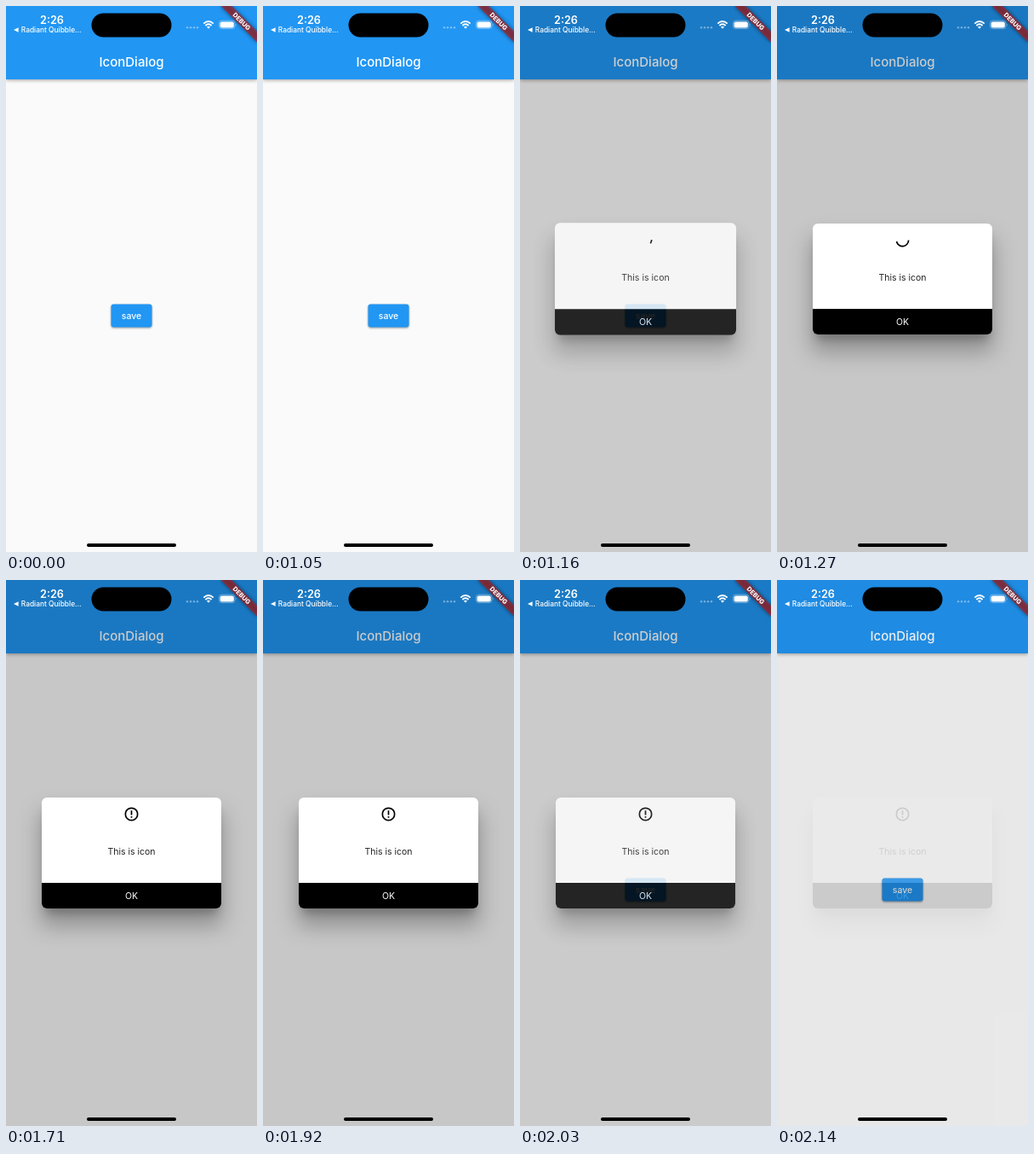
These frames come from a looping animation (295x640 px, 2.24 s). An HTML page:

```html
<!DOCTYPE html>
<html lang="en">
<head>
<meta charset="utf-8">
<title>IconDialog</title>
<style>
  html, body { margin: 0; width: 100%; height: 100%; overflow: hidden; background: #fafafa; }
  svg { display: block; width: 295px; height: 640px; }
  text { font-family: Inter, Roboto, sans-serif; font-size: 10.5px; fill: #fff; }
  .mid { text-anchor: middle; }
  .medium { font-weight: 500; }
  .semi { font-weight: 600; }
  .bar { filter: drop-shadow(0 1.5px 2px rgba(0, 0, 0, .36)); }
  .button { filter: drop-shadow(0 1.3px 1.2px rgba(0, 0, 0, .4)); }
  .soft { filter: blur(5px); }
  .wide { filter: blur(13px); }
  .banner-shadow { filter: blur(2.5px); }
  #dialog { transform-origin: 147.5px 320px; }
</style>
</head>
<body>
<svg viewBox="0 0 295 640">
  <rect width="295" height="640" fill="#fafafa"/>
  <rect class="bar" width="295" height="86" fill="#2196f3"/>
  <text class="mid medium" x="147.5" y="70.7" style="font-size:15px">IconDialog</text>
  <rect class="button" x="123.5" y="349.5" width="48" height="27" rx="3" fill="#2196f3"/>
  <text class="mid medium" x="147.5" y="366.6">save</text>

  <rect id="barrier" width="295" height="640"/>

  <g id="dialog">
    <rect class="wide" x="40" y="272" width="215" height="134" rx="8" fill-opacity=".27"/>
    <rect class="soft" x="46" y="267" width="203" height="124" rx="6" fill-opacity=".2"/>
    <rect x="42" y="255" width="211" height="130" rx="6" fill="#fff"/>
    <path d="M42 355H253V379A6 6 0 0 1 247 385H48A6 6 0 0 1 42 379Z"/>
    <g fill="none" stroke="#000" stroke-width="1.7">
      <path id="ring"/>
      <path id="stem"/>
      <path id="dot"/>
    </g>
    <text class="mid" x="147.5" y="322.2" style="fill:#222">This is icon</text>
    <text class="mid" x="147.5" y="373.7">OK</text>
  </g>

  <g transform="translate(295 0) rotate(45)">
    <rect class="banner-shadow" x="-30" y="21" width="60" height="9" fill-opacity=".5"/>
    <rect x="-30" y="21" width="60" height="9" fill="#b71c1c" fill-opacity=".63"/>
    <text class="mid" x="0" y="28.2" style="font-size:7.4px;font-weight:800">DEBUG</text>
  </g>

  <rect x="100.5" y="8.5" width="94" height="28" rx="14"/>
  <text class="mid semi" x="54" y="20.6" style="font-size:12.7px">2:26</text>
  <path d="M9 28L14.6 25.2V30.8Z" fill="#fff"/>
  <text class="medium" x="17.8" y="31" style="font-size:8.4px">Radiant Quibble…</text>
  <g id="signal" fill="#fff" fill-opacity=".4"></g>
  <g fill="none" stroke="#fff" stroke-width="1.9">
    <path d="M232.3 20.6Q238 15.3 243.7 20.6"/>
    <path d="M234.4 23Q238 19.7 241.6 23"/>
  </g>
  <path d="M238 26.8L236 24.6Q238 23 240 24.6Z" fill="#fff"/>
  <rect x="250.4" y="17.2" width="18.6" height="9.4" rx="3" fill="none" stroke="#fff" stroke-opacity=".45" stroke-width=".8"/>
  <rect x="251.6" y="18.4" width="16.2" height="7" rx="2" fill="#fff"/>
  <path d="M270 20.4Q271.4 21.9 270 23.4Z" fill="#fff" fill-opacity=".5"/>
  <rect x="95" y="630" width="105" height="4" rx="2"/>
</svg>
<script>
const LOOP = 2240, STEP = 110;
const CX = 147.5, CY = 274.5, R = 7.1;
const $ = id => document.getElementById(id);
const clamp = v => Math.max(0, Math.min(1, v));
const set = (id, name, value) => $(id).setAttribute(name, value);

$("signal").innerHTML = [0, 1, 2, 3]
  .map(i => `<circle cx="${213 + i * 4}" cy="25.3" r="1.2"/>`).join("");

// Linear interpolation through [time, value] points
function track(t, points) {
  for (let i = 1; i < points.length; i++) {
    const [a, from] = points[i - 1], [b, to] = points[i];
    if (t <= b) return from + (to - from) * clamp((t - a) / (b - a));
  }
  return points[points.length - 1][1];
}

// The picture moves in steps: opening, icon drawing, then closing
function snap(t) {
  if (t < 1050) return 0;
  const start = t < 1920 ? 1050 : 1920;
  const stepped = start + Math.floor((t - start) / STEP) * STEP;
  return start === 1050 ? Math.min(stepped, 1710) : stepped;
}

function ringPath(part) {
  if (part <= 0) return "";
  const a = Math.min(part, .9999) * 2 * Math.PI;
  const x = CX + R * Math.cos(a), y = CY + R * Math.sin(a);
  return `M${CX + R} ${CY}A${R} ${R} 0 ${part > .5 ? 1 : 0} 1 ${x} ${y}${part >= 1 ? "Z" : ""}`;
}

const line = (y, length) => length > 0 ? `M${CX} ${y}v${length}` : "";

function draw(now) {
  const t = snap(now % LOOP);
  const fade = track(t, [[1050, 0], [1160, .82], [1270, 1], [1920, 1], [2030, .82], [2140, .12], [2240, 0]]);
  const shade = track(t, [[1050, 0], [1160, .19], [1270, .205], [1920, .205], [2030, .19], [2140, .07], [2240, 0]]);
  const scale = track(t, [[1050, .9], [1160, 1.01], [1270, 1]]);
  set("barrier", "fill-opacity", shade);
  set("dialog", "opacity", fade);
  $("dialog").style.transform = `scale(${scale})`;
  set("ring", "d", ringPath(clamp((t - 1130) / 300)));
  set("stem", "d", line(270.2, 5.3 * clamp((t - 1435) / 165)));
  set("dot", "d", line(277, 1.7 * clamp((t - 1600) / 110)));
}

let begin;
function tick(now) {
  begin ??= now;
  draw(Math.max(0, now - begin));
  requestAnimationFrame(tick);
}
draw(0);
requestAnimationFrame(tick);
</script>
</body>
</html>
```
